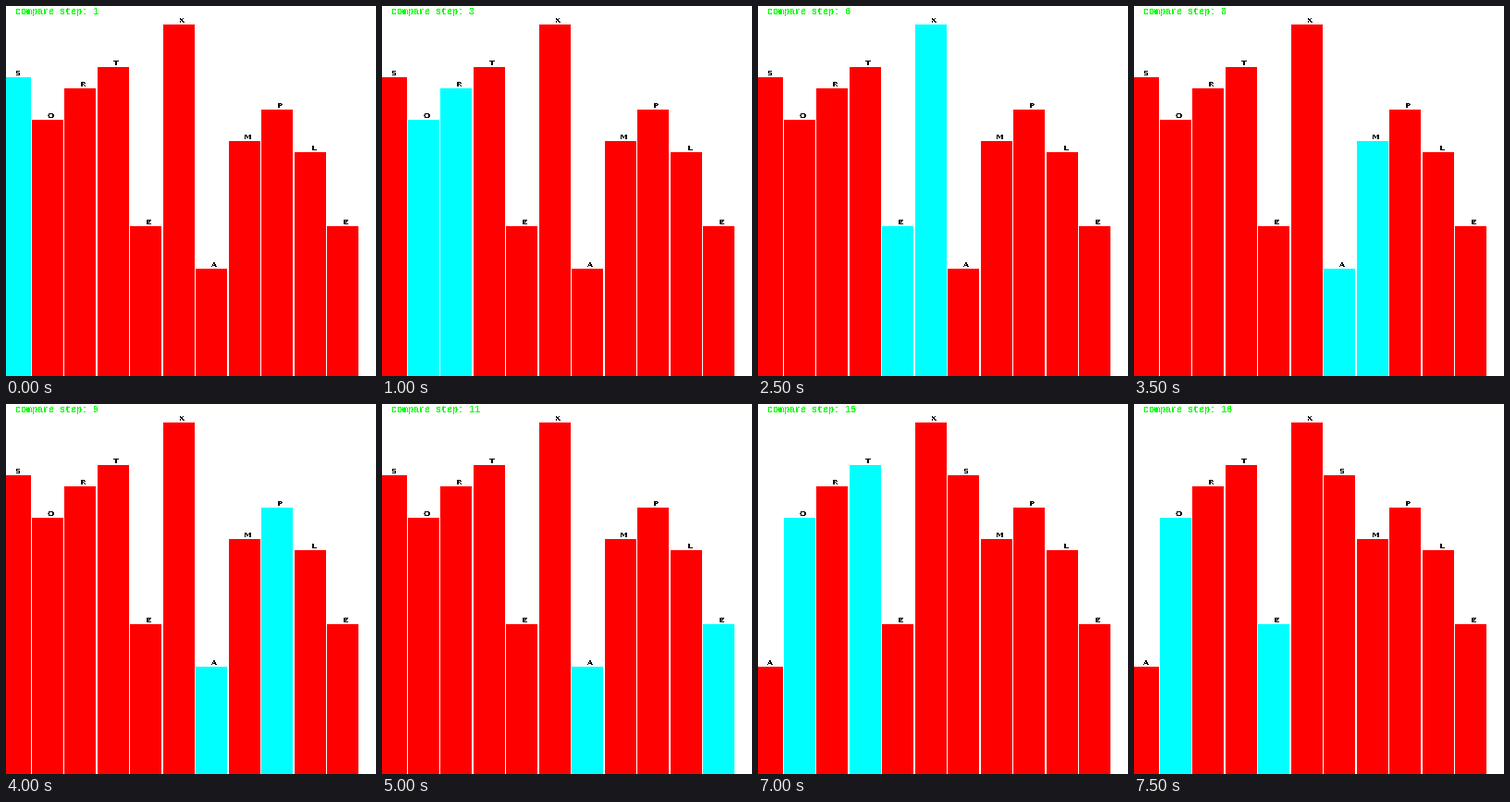
These frames come from a looping animation (400 px wide and 400 px high, 8 s). A matplotlib script:

```python
import math

import matplotlib.pyplot as plt
from matplotlib.animation import FuncAnimation

SIZE, DPI = 400, 100
FRAMES, INTERVAL = 16, 500
LETTERS = "SORTEXAMPLE"
PITCH, BAR_W = 390 / 11, 34
IDLE, ACTIVE, LABEL = "#ff0000", "#00ffff", "#00ff00"

plt.rcParams["text.antialiased"] = False


def px(size):
    return size * 72 / DPI


def snap(v):
    return math.floor(v + 0.5)


def bar_top(letter):
    return snap(284 - 11.5 * (ord(letter) - ord("A")))


def selection_sort(word):
    """Yield (letters, highlighted bars) for each compare and exchange."""
    a = list(word)
    for i in range(len(a)):
        low = i
        for j in range(i, len(a)):
            yield "".join(a), {low, j}
            if a[j] < a[low]:
                low = j
        yield "".join(a), {i, low}
        a[i], a[low] = a[low], a[i]


steps = [s for s, _ in zip(selection_sort(LETTERS), range(FRAMES))]

fig = plt.figure(figsize=(SIZE / DPI, SIZE / DPI), dpi=DPI, facecolor="white")
ax = fig.add_axes([0, 0, 1, 1])
ax.set_xlim(0, SIZE)
ax.set_ylim(SIZE, 0)
ax.axis("off")

bars, tags = [], []
for k in range(len(LETTERS)):
    x = 9.5 + PITCH * k
    bar = plt.Rectangle((snap(x - BAR_W / 2), 0), BAR_W, 1,
                        linewidth=0, antialiased=False)
    bars.append(ax.add_patch(bar))
    tags.append(ax.text(snap(x + 3), 0, "", ha="center", va="baseline",
                        family="DejaVu Serif", weight="bold",
                        fontsize=px(8.2), color="black"))

counter = ax.text(10, 9, "", ha="left", va="baseline", weight="bold",
                  family="Liberation Mono", fontsize=px(10), color=LABEL)


def draw(n):
    word, lit = steps[n]
    for k, letter in enumerate(word):
        top = bar_top(letter)
        bars[k].set_y(top)
        bars[k].set_height(SIZE - top)
        bars[k].set_facecolor(ACTIVE if k in lit else IDLE)
        tags[k].set_text(letter)
        tags[k].set_y(top - 2)
    counter.set_text(f"compare step: {n + 1}")
    return [*bars, *tags, counter]


anim = FuncAnimation(fig, draw, frames=FRAMES, interval=INTERVAL,
                     init_func=lambda: draw(0), repeat=True, repeat_delay=0)
plt.show()
```
